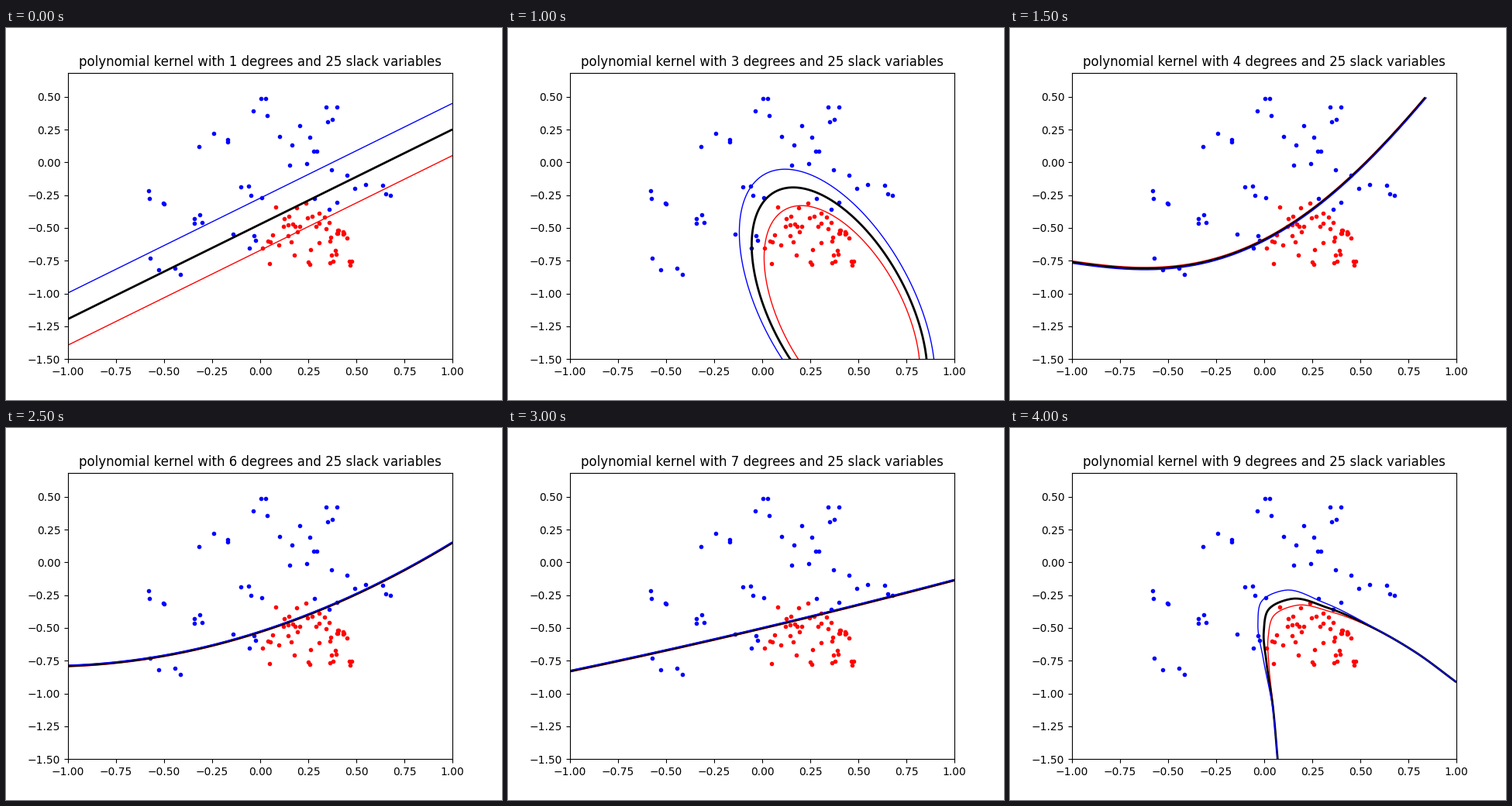
These frames come from a looping animation (640 px wide and 480 px high, 4.5 s). A matplotlib script:

```python
import numpy as np
import matplotlib.pyplot as plt
from matplotlib.animation import FuncAnimation

W, H, DPI = 640, 480, 100
LEFT, RIGHT, TOP, BOTTOM = 80, 576, 57.6, 427.2
X_MIN, X_MAX, Y_MIN, Y_MAX = -1, 1, -1.5, 0.6837
GRID_TOP = 0.5
DOTS = 50
SIDES = {"red": -1, "black": 0, "blue": 1}

rng = np.random.default_rng(4)


def blue_cloud():
    """Loose groups that arch over the red box."""
    centres = [(-0.58, -0.32), (-0.50, -0.76), (-0.32, -0.43), (-0.11, -0.58),
               (-0.06, -0.28), (-0.24, 0.18), (0.04, 0.42), (0.17, 0.22),
               (0.21, -0.01), (0.40, 0.40), (0.60, -0.27), (0.33, -0.28),
               (0.45, -0.10)]
    jitter = rng.uniform(-1, 1, (DOTS, 2)) * (0.09, 0.11)
    return (np.resize(centres, (DOTS, 2)) + jitter).T


def red_cloud():
    """Even box with its upper right corner cut out."""
    x = rng.uniform(0.01, 0.48, DOTS)
    high = np.where(x > 0.36, -0.51, -0.31)
    return x, rng.uniform(-0.79, high)


def to_data(px, py):
    """Stage pixels to axes coordinates."""
    x = X_MIN + (px - LEFT) / (RIGHT - LEFT) * (X_MAX - X_MIN)
    y = Y_MAX - (py - TOP) / (BOTTOM - TOP) * (Y_MAX - Y_MIN)
    return x, y


def arch(x_top, y_top, lean, a, b):
    """Leaning conic that opens downwards from its top, in pixels."""
    d = np.linspace(0, 1, 60) ** 2 * 290
    half = np.sqrt(np.maximum(a * d - b * d * d, 0))
    mid = x_top + lean * d
    x = np.r_[(mid - half)[::-1], (mid + half)[1:]]
    return to_data(x, y_top + np.r_[d[::-1], d[1:]])


def spline(p, steps=12):
    """Cubic Hermite curve through the points."""
    step = np.hypot(*np.diff(p, axis=0).T)
    m = np.gradient(p, np.r_[0, np.cumsum(step)], axis=0)
    s = np.linspace(0, 1, steps)[None, :, None]
    h = step[:, None, None]
    p0, p1, m0, m1 = p[:-1, None], p[1:, None], m[:-1, None], m[1:, None]
    curve = ((2 * s**3 - 3 * s**2 + 1) * p0 + (s**3 - 2 * s**2 + s) * h * m0
             + (3 * s**2 - 2 * s**3) * p1 + (s**3 - s**2) * h * m1)
    return curve.reshape(-1, 2).T


def graph(func, gap):
    """Function graph, cut off at the top of the evaluated area."""
    x = np.linspace(X_MIN, X_MAX, 400)
    y = func(x) + gap
    return x, np.where(y <= GRID_TOP, y, np.nan)


def bend(x, x_low, y_low):
    """Shallow valley that rises steeply to the right."""
    t = x - x_low
    return y_low + t**2 * (0.45 + 0.25 * t - 0.095 * t**2)


def hook(side):
    """Narrow arch; the margins part from it only around its crown."""
    p = np.array([(345.3, 427), (339, 358), (331, 303), (327.5, 262), (333, 235),
                  (363, 220.5), (410, 232), (470, 258.5), (525, 290.5), (576, 328)])
    weight = np.exp(-((p - (355, 240)) ** 2).sum(axis=1) / 75**2)
    reach = 0.75 if side < 0 else 1
    p -= side * reach * weight[:, None] * (9.5, 12)
    return to_data(*spline(p))


# one rule per degree; side is -1, 0 or 1 for red margin, boundary, blue margin
RULES = [
    lambda k: graph(lambda x: 0.7225 * x - 0.472, 0.199 * k),
    lambda k: arch(386 - 14 * k, 228 - 29 * k, 0.483, 152 + 10 * k, 0.1712),
    lambda k: arch(368 - 10.5 * k, 205.7 - 23.5 * k, 0.3795 + 0.005 * k,
                   117.8 + 12.9 * k, 0.374),
    lambda k: graph(lambda x: bend(x, -0.62, -0.81), -0.009 * k),
    lambda k: graph(lambda x: bend(x, -0.575, -0.82), -0.009 * k),
    lambda k: graph(lambda x: -0.53 + 0.47 * x + 0.21 * x**2, 0.006 * k),
    lambda k: graph(lambda x: -0.503 + 0.347 * x + 0.02 * x**2, 0.006 * k),
    lambda k: graph(lambda x: -0.55 + 0.38 * x + 0.11 * x**2, 0.006 * k),
    hook,
]

fig = plt.figure(figsize=(W / DPI, H / DPI), dpi=DPI)
ax = fig.add_axes([LEFT / W, 1 - BOTTOM / H, (RIGHT - LEFT) / W, (BOTTOM - TOP) / H])
ax.set_xlim(X_MIN, X_MAX)
ax.set_ylim(Y_MIN, Y_MAX)
ax.set_xticks(np.arange(-1, 1.01, 0.25))
ax.set_yticks(np.arange(-1.5, 0.51, 0.25))
title = ax.set_title("")

ax.plot(*blue_cloud(), "b.")
ax.plot(*red_cloud(), "r.")
lines = {color: ax.plot([], [], color=color, lw=1 if side else 2,
                        solid_capstyle="butt")[0]
         for color, side in SIDES.items()}


def draw(i):
    title.set_text(f"polynomial kernel with {i + 1} degrees and 25 slack variables")
    for color, side in SIDES.items():
        lines[color].set_data(*RULES[i](side))
    return [title, *lines.values()]


anim = FuncAnimation(fig, draw, frames=len(RULES), interval=500,
                     repeat=True, repeat_delay=0, blit=False)
plt.show()
```
